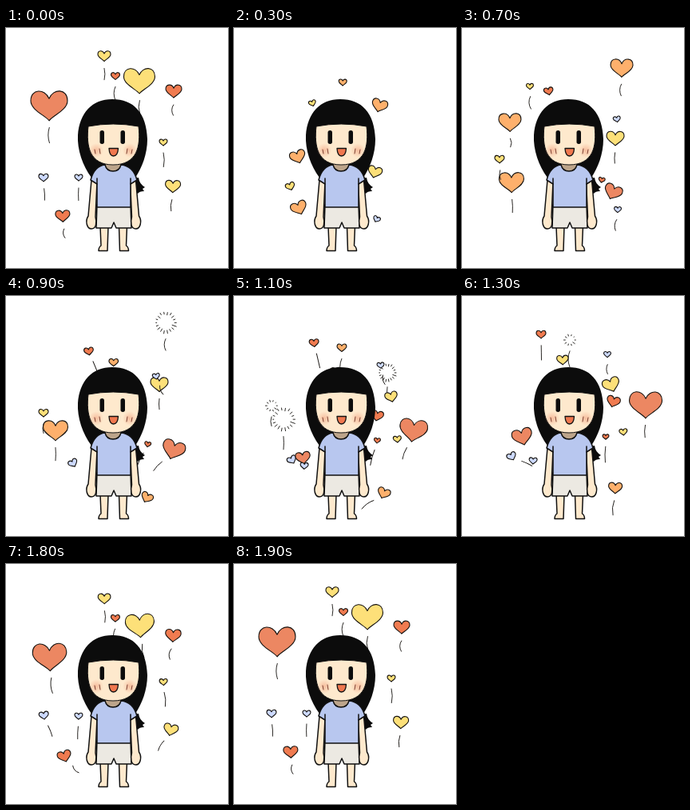
These frames come from a looping animation (278x300 px, 2 s). An HTML page with a canvas:

```html
<!DOCTYPE html>
<html lang="en">
<head>
<meta charset="utf-8">
<title>Girl with floating hearts</title>
<style>
  html, body { margin: 0; width: 100%; height: 100%; overflow: hidden; background: #fff; }
  canvas, svg { position: absolute; left: 0; top: 0; width: 278px; height: 300px; }
</style>
</head>
<body>
<canvas id="sky" width="278" height="300"></canvas>
<svg viewBox="0 0 278 300" stroke-linejoin="round" stroke-linecap="round">
  <defs>
    <radialGradient id="blush">
      <stop offset="0" stop-color="#f3a583" stop-opacity=".65"/>
      <stop offset="1" stop-color="#f3a583" stop-opacity="0"/>
    </radialGradient>
  </defs>
  <!-- hair with the loose lock on the right -->
  <path fill="#0c0c0c" d="M133 89C108 89 92 106 90 134C89 152 96 172 107 187L122 176H148L162 187C170 175 177 158 177 139C176 106 160 89 133 89Z"/>
  <path fill="#0c0c0c" d="M161 188L166 187Q167 195 174 199L171 201L173 204Q167 204 165 207L162 205Z"/>
  <g stroke="#111" stroke-width="1.5">
    <!-- legs -->
    <path id="leg" fill="#fee9cd" d="M118 248L119 272Q116 274 116 278.500H127L128 248Z"/>
    <use href="#leg" transform="matrix(-1 0 0 1 269.500 0)"/>
    <path fill="#ece9e2" d="M114 221L113 250H132L135 243L138 250H157L156 221Z"/>
    <!-- arms -->
    <g fill="#fee9cd">
      <path id="arm" d="M107 190L103 235C99 241 101 251 107 251C113 251 114 243 112 236L114 192Z"/>
      <use href="#arm" transform="matrix(-1 0 0 1 269.500 0)"/>
    </g>
    <path fill="#bda58b" d="M124 168V175Q134 184 144 175V168Z"/>
    <path fill="#b8c7ef" d="M124 171C115 172 109 179 106 190L114 195V224H156V195L164 190C161 179 155 172 144 171Q142 179 134 179Q126 179 124 171Z"/>
    <path fill="none" d="M114 195V188M156 195V188"/>
  </g>
  <!-- face -->
  <path fill="#fee9cd" stroke="#111" d="M103 123Q134 117 166 123C169 148 164 171 134 171C105 171 100 148 103 123Z"/>
  <circle cx="113" cy="153" r="9" fill="url(#blush)"/>
  <circle cx="155" cy="153" r="9" fill="url(#blush)"/>
  <path stroke="#7d4030" d="M111 152l1 5M117 151l1 6M152 151l-1 6M158 152l-1 5"/>
  <g fill="#0c0c0c">
    <rect x="117.500" y="128" width="5.500" height="17" rx="2.700"/>
    <rect x="143.500" y="128" width="5.500" height="17" rx="2.700"/>
  </g>
  <path fill="#f0784f" stroke="#111" stroke-width="1.300" d="M129 150.500H140.500Q140 160 134.500 160Q129.500 160 129 150.500Z"/>
</svg>
<script>
const STEP = 100, STEPS = 20, END = 1900, GIRL_X = 134;
const RED = '#ec8762', CORAL = '#f07b50', ORANGE = '#feb06c', YELLOW = '#fde079', BLUE = '#ccd9ff';
const ctx = document.getElementById('sky').getContext('2d');
const shape = new Path2D('M0 .41C-.1 .27-.5 .12-.5-.13C-.5-.46-.12-.48 0-.19C.12-.48 .5-.46 .5-.13C.5 .12 .1 .27 0 .41Z');
const hearts = [];

// A wave shares its timing. Each heart gives where it ends, its size and its rise;
// without its own drift it spreads away from the girl.
function wave(timing, ...rows) {
  for (const [color, x, y, size, rise, drift = (x - GIRL_X) * 0.27] of rows) {
    const growth = Math.min(0.45, Math.max(0, (size - 10) / 60));
    hearts.push({ ...timing, color, x, y, size, rise, drift, growth });
  }
}

const early = { born: 100, from: 300, to: 700 };
wave({ ...early, pop: 500 }, [ORANGE, 137, 40, 10, 28]);
wave({ ...early, pop: 800 },
  [ORANGE, 60, 118, 28, 43], [YELLOW, 85, 73, 9, 21], [BLUE, 195, 227, 9, 12]);
wave({ ...early, pop: 900 }, [ORANGE, 200, 50, 28, 47]);
wave({ ...early, pop: 1100 },
  [ORANGE, 62, 193, 31, 32], [YELLOW, 47, 164, 12, 34], [YELLOW, 192, 138, 22, 42]);

wave({ born: 500, from: 700, to: 1300, pop: 1400 },
  [RED, 230, 136, 41, 69, 41], [CORAL, 180, 176, 8, 14, 5], [CORAL, 99, 48, 12, 31], [BLUE, 182, 73, 9, 41, -12]);
wave({ born: 800, from: 900, to: 1200, pop: 1300 }, [ORANGE, 135, 55, 12, 28]);
wave({ born: 800, from: 900, to: 1300, pop: 1400 }, [ORANGE, 192, 240, 17, 12]);

wave({ born: 800, from: 900, to: END, pop: 2000 }, [BLUE, 47, 187, 12, 22, -37]);
wave({ born: 1100, from: 1300, to: END, pop: 2000 },
  [RED, 54, 97, 46, 79], [YELLOW, 123, 35, 16, 45], [YELLOW, 167, 66, 39, 45, -20],
  [CORAL, 210, 79, 20, 53], [YELLOW, 197, 143, 10, 27, -5], [BLUE, 91, 187, 10, 19, 2]);
wave({ born: 1400, from: 1600, to: END, pop: 2000 },
  [CORAL, 137, 60, 11, 23], [YELLOW, 209, 198, 19, 24], [CORAL, 71, 235, 18, 14]);

const random = n => { const v = Math.sin(n * 12.9898) * 43758.5453; return v - Math.floor(v); };
const progress = (h, t) => (t - h.from) / (h.to - h.from);

// Sideways motion eases out, while larger hearts speed up as they climb.
function place(h, t) {
  const u = progress(h, t);
  const side = Math.sin(Math.min(u, 1) * Math.PI / 2);
  const climb = u > 0 ? u ** (1 + h.growth * 1.2) : u;
  return [h.x - h.drift * (1 - side), h.y + h.rise * (1 - climb)];
}

function drawHeart(color, w, angle) {
  ctx.save();
  ctx.rotate(angle * 0.42);
  ctx.scale(w, w);
  ctx.lineWidth = 1.1 / w;
  ctx.fillStyle = color;
  ctx.fill(shape);
  ctx.stroke(shape);
  ctx.restore();
}

function drawPop(w) {
  const r = w * 0.4 + 3, rays = w > 20 ? 18 : 10;
  ctx.beginPath();
  for (let i = 0; i < rays; i++) {
    const a = i / rays * Math.PI * 2, c = Math.cos(a), s = Math.sin(a);
    const inner = r * (0.6 + random(i + 1) * 0.2), outer = r * (0.85 + random(i + 40) * 0.15);
    ctx.moveTo(c * inner, s * inner);
    ctx.lineTo(c * outer, s * outer);
  }
  ctx.stroke();
}

// A bent stroke behind the heart, along the way it came.
function drawTrail(w, angle, seed) {
  const start = w * 0.4 + 9, length = 10 + random(seed) * 10;
  const bend = (random(seed + 60) - 0.5) * 9;
  ctx.save();
  ctx.rotate(angle);
  ctx.beginPath();
  ctx.moveTo(0, start);
  ctx.quadraticCurveTo(bend, start + length / 2, 0, start + length);
  ctx.stroke();
  ctx.restore();
}

function draw(t) {
  ctx.clearRect(0, 0, 278, 300);
  ctx.strokeStyle = '#15120f';
  ctx.lineCap = ctx.lineJoin = 'round';
  hearts.forEach((h, i) => {
    if (t < h.born || t > h.pop) return;
    const at = Math.min(t, h.pop - STEP), u = progress(h, at);
    const [x, y] = place(h, at);
    const [px, py] = place(h, at - STEP / 2), [nx, ny] = place(h, at + STEP / 2);
    const angle = Math.atan2(nx - px, py - ny);
    const w = h.size * (1 - h.growth * (1 - Math.min(u, 1)));
    ctx.save();
    ctx.translate(x, y);
    ctx.lineWidth = 0.9;
    if (u > 0.3) drawTrail(w, angle, i + 1);
    if (t === h.pop) drawPop(w);
    else drawHeart(h.color, w, angle);
    ctx.restore();
  });
}

function tick() {
  const step = Math.floor(performance.now() / STEP) % STEPS;
  draw(step * STEP || END);
  requestAnimationFrame(tick);
}
tick();
</script>
</body>
</html>
```
